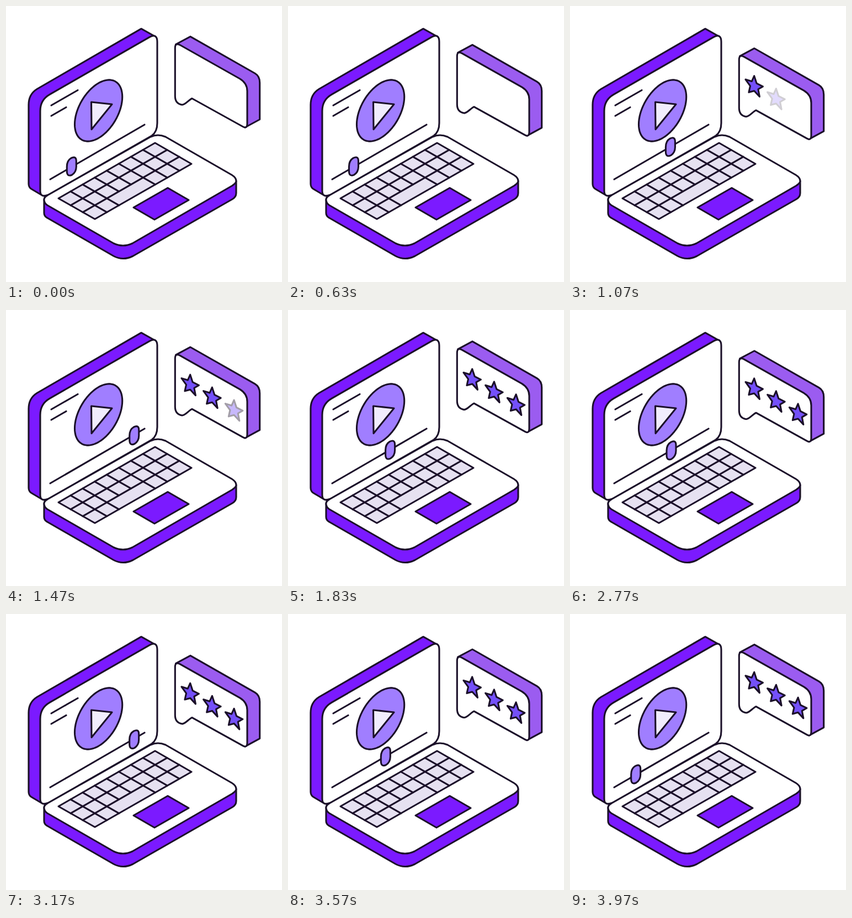
These frames come from a looping animation (500 by 500 pixels, 4000 ms). An HTML page:

```html
<!DOCTYPE html>
<html lang="en">
<head>
<meta charset="utf-8">
<title>Laptop review</title>
<style>
  html, body { margin: 0; width: 100%; height: 100%; overflow: hidden; background: #fff; }
  svg { display: block; width: 100vw; height: 100vh; }
  .ink { stroke: #1b1029; stroke-width: 3.1; stroke-linejoin: round; stroke-linecap: round; fill: none; }
  .ink .violet { fill: #7b1aff; }
  .ink .orchid { fill: #9b5cf0; }
  .ink .lilac { fill: #a07eff; }
  .ink .pale { fill: #e6e1f1; }
  .ink .frost { fill: #f1edfd; }
  .ink .white { fill: #fff; }
  .ink .star { fill: #7450fa; }
</style>
</head>
<body>
<svg viewBox="0 0 500 500">
  <g class="ink">
    <!-- screen -->
    <path class="violet" d="M72 345L62 341L46 331.500Q41 328.500 41 322V179Q41 160 56 150.500L245 41.200L268 54L262 236Z"/>
    <path class="white" d="M62 335V190Q62 170 79 160.300L260 56.300Q274 49 274 65V212Q274 228 264 235L77 342Q62 348 62 335Z"/>
    <path d="M82 180L130 152.500M82 199L109 183.500M80 314L251 215"/>
    <path id="disc" class="lilac"/>
    <path class="frost" d="M154.500 174L192 178L155 223.500Z"/>
    <path id="knob" class="lilac" d="M110.300 291Q110.300 280 118 275.500Q127.300 271 127.300 281V291Q127.300 301 119.500 306Q110.300 310 110.300 299Z"/>

    <!-- base -->
    <path class="violet" d="M69 350V375Q69 381 75 384L195 453Q212 462 230 453L410 350Q417 346 417 339V317Z"/>
    <path class="white" d="M75 343L262 237Q275 231 289 237L409 306Q417 311 417 317Q417 321 409 326L229 430Q212 438 195 430L75 361Q69 357 69 351Q69 346 75 343Z"/>
    <path class="pale" d="M95 348.500L270 248L336 286L161 386Z"/>
    <path id="keys"/>
    <path class="violet" d="M231 365L293 329.500L331 351.500L269 387Z"/>

    <!-- speech bubble -->
    <g id="bubble">
      <path class="orchid" d="M307.500 69.500L334 55.300L451 122Q459.700 127 459.700 139V205.500L433 220Z"/>
      <path class="white" d="M306.300 76Q306.300 66 315 70.500L424 132Q437 140 437 154V213Q437 223 429 218.500L337 167.500C331 170 325 179 319 179Q306.300 177 306.300 163Z"/>
    </g>
  </g>
</svg>
<script>
  const LOOP = 4000, FPS = 30;
  const $ = id => document.getElementById(id);
  const clamp = v => Math.min(1, Math.max(0, v));
  const ease = v => v * v * (3 - 2 * v);
  const polygon = pts => 'M' + pts.map(p => p.map(v => v.toFixed(2)).join(' ')).join('L') + 'Z';

  // Ring of points around a centre, flattened and sheared onto an isometric plane
  function ring(count, radius, cx, cy, squash, shear) {
    return polygon(Array.from({ length: count }, (_, i) => {
      const a = i * 2 * Math.PI / count, r = radius(i);
      const x = r * Math.sin(a), y = -r * Math.cos(a);
      return [cx + x * squash, cy + x * shear + y];
    }));
  }

  $('disc').setAttribute('d', ring(72, () => 49.8, 167.6, 189.5, 0.866, -0.5));

  // Keyboard grid: 8 columns by 3 rows, with a space bar in the last row
  const key = (u, v) => `${95 + 21.875 * u + 22 * v} ${348.5 - 12.55 * u + 12.55 * v}`;
  let grid = '';
  for (const v of [1, 2]) grid += `M${key(0, v)}L${key(8, v)}`;
  for (let u = 1; u < 8; u++) grid += `M${key(u, 0)}L${key(u, u > 2 && u < 5 ? 2 : 3)}`;
  $('keys').setAttribute('d', grid);

  const stars = [0, 1, 2].map(n => {
    const star = document.createElementNS('http://www.w3.org/2000/svg', 'path');
    star.setAttribute('class', 'star');
    star.setAttribute('d', ring(10, i => i % 2 ? 8.5 : 18.6, 333.7 + 39.7 * n, 123.8 + 23 * n, 0.89, 0.36));
    $('bubble').append(star);
    return star;
  });

  // Triangle wave between 0 and 1, eased at both ends
  const swing = (t, half) => {
    const p = (t / half) % 2;
    return ease(p < 1 ? p : 2 - p);
  };

  function draw(ms) {
    const t = Math.floor(((ms + 4) % LOOP) * FPS / 1000) * 1000 / FPS;
    $('bubble').setAttribute('transform', `translate(0 ${21.7 * swing(t, 1000)})`);
    const k = swing(Math.max(0, t - 612), 846);
    $('knob').setAttribute('transform', `translate(${113.5 * k} ${-63.5 * k})`);
    stars.forEach((s, n) => s.setAttribute('opacity', clamp((t - 667 - 333 * n) / 333)));
  }

  const start = performance.now();
  function tick() {
    draw(performance.now() - start);
    requestAnimationFrame(tick);
  }
  draw(0);
  requestAnimationFrame(tick);
</script>
</body>
</html>
```
